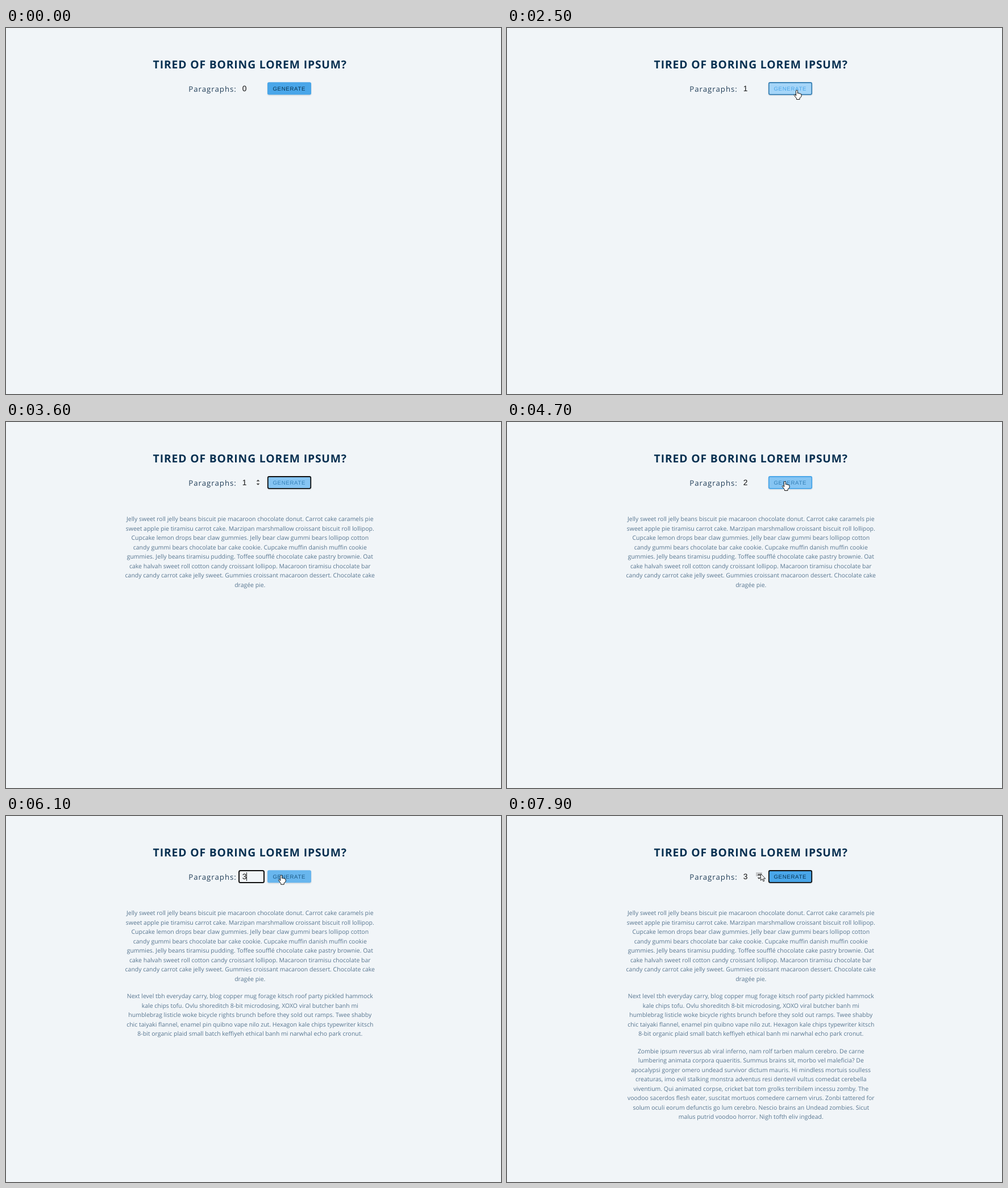
Write an HTML page that moves like this. It is 871 px wide and 643 px high and loops after 8 s.

```html
<!DOCTYPE html>
<html lang="en">
<head>
<meta charset="utf-8">
<title>Lorem ipsum generator</title>
<style>
  html, body { margin: 0; width: 100%; height: 100%; overflow: hidden; background: #f1f5f8; }
  svg { display: block; width: 871px; height: 643px; }
  text { font-family: "Open Sans", "Noto Sans", sans-serif; text-rendering: geometricPrecision; white-space: pre; }
  .title { font-size: 19.3px; font-weight: 700; letter-spacing: .87px; fill: #062f50; }
  .label { font-size: 13.2px; letter-spacing: 1.02px; fill: #24405a; }
  .value { font: 13.75px "Liberation Sans", Arial, sans-serif; fill: #111; }
  .caption { font: 9.6px "Liberation Sans", Arial, sans-serif; letter-spacing: .72px; }
  .para { font-size: 10.47px; fill: #587690; text-anchor: middle; }
  #face { filter: drop-shadow(0 1px 1px rgba(0, 0, 0, .16)); }
  #arrow, #hand { fill: #fff; stroke: #111; stroke-linejoin: round; }
</style>
</head>
<body>
<svg viewBox="0 0 871 643">
  <rect width="871" height="643" fill="#f1f5f8"/>
  <text class="title" x="258.6" y="71">TIRED OF BORING LOREM IPSUM?</text>
  <text class="label" x="321.3" y="111.8">Paragraphs:</text>

  <rect id="ring" x="410" y="96" width="44" height="21" rx="2.5" fill="none" stroke="#111" stroke-width="2"/>
  <text id="value" class="value" x="415.7" y="111.2"></text>
  <rect id="caret" x="423" y="99" width="1" height="15" fill="#222"/>
  <g id="spin" fill="#444">
    <rect id="hot" x="438" y="99" width="11" height="7" fill="#c6c8ca"/>
    <path d="M440.6 104.2l2.9-3 2.9 3zM440.6 107.9l2.9 3 2.9-3z"/>
  </g>

  <rect id="face" x="460" y="95.3" width="77" height="21.9" rx="2.75"/>
  <text id="caption" class="caption" x="469.4" y="109.8">GENERATE</text>
  <rect id="outline" x="460.8" y="96" width="75.4" height="20.8" rx="2.2" fill="none" stroke-width="1.8"/>

  <g id="copy"></g>

  <path id="arrow" stroke-width=".9" d="M.5 .5V12.2L3.2 9.7 5 13.9 6.8 13.1 5 9.1H8.7Z"/>
  <path id="hand" stroke-width="1" d="M-1.5 10V1.8a1.5 1.5 0 0 1 3 0V6a1.4 1.4 0 0 1 2.6.4 1.3 1.3 0 0 1 2.3.6 1.2 1.2 0 0 1 1.6 1.2v3.3L5 14v2.5H-.5V14.8L-4.6 9.3C-5.2 8-3.6 7.2-2.8 8.2Z"/>
</svg>
<script>
const LOOP = 8000, STEP = 100, FADE = 300, REPLY = 120;
const LEAD = 16.5, GAP = 14.2, TOP = 174, CENTER = 429.3;
const $ = id => document.getElementById(id);

// Each round: pick a number in the field, click the button, get one more paragraph
const rounds = [
  { pick: 1400, click: 2430, text: `Jelly sweet roll jelly beans biscuit pie macaroon chocolate donut. Carrot cake caramels pie
sweet apple pie tiramisu carrot cake. Marzipan marshmallow croissant biscuit roll lollipop.
Cupcake lemon drops bear claw gummies. Jelly bear claw gummi bears lollipop cotton
candy gummi bears chocolate bar cake cookie. Cupcake muffin danish muffin cookie
gummies. Jelly beans tiramisu pudding. Toffee soufflé chocolate cake pastry brownie. Oat
cake halvah sweet roll cotton candy croissant lollipop. Macaroon tiramisu chocolate bar
candy candy carrot cake jelly sweet. Gummies croissant macaroon dessert. Chocolate cake
dragée pie.` },
  { pick: 4400, click: 4700, text: `Next level tbh everyday carry, blog copper mug forage kitsch roof party pickled hammock
kale chips tofu. Ovlu shoreditch 8-bit microdosing, XOXO viral butcher banh mi
humblebrag listicle woke bicycle rights brunch before they sold out ramps. Twee shabby
chic taiyaki flannel, enamel pin quibno vape nilo zut. Hexagon kale chips typewriter kitsch
8-bit organic plaid small batch keffiyeh ethical banh mi narwhal echo park cronut.` },
  { pick: 5900, click: 6450, text: `Zombie ipsum reversus ab viral inferno, nam rolf tarben malum cerebro. De carne
lumbering animata corpora quaeritis. Summus brains sit, morbo vel maleficia? De
apocalypsi gorger omero undead survivor dictum mauris. Hi mindless mortuis soulless
creaturas, imo evil stalking monstra adventus resi dentevil vultus comedat cerebella
viventium. Qui animated corpse, cricket bat tom grolks terribilem incessu zomby. The
voodoo sacerdos flesh eater, suscitat mortuos comedere carnem virus. Zonbi tattered for
solum oculi eorum defunctis go lum cerebro. Nescio brains an Undead zombies. Sicut
malus putrid voodoo horror. Nigh tofth eliv ingdead.` }
];

// Pointer stops and the moves between them
const spinner = [446, 101], button = [489, 104], label = [350, 104], title = [555, 67];
const moves = [
  { from: 100, to: 400, stop: [345, 82] },
  { from: 400, to: 1000, stop: spinner },
  { from: 1600, to: 1800, stop: [498, 107] },
  { from: 1900, to: 2300, stop: [510, 109] },
  { from: 2600, to: 2700, stop: title },
  { from: 2700, to: 2900, stop: [590, 256] },
  { from: 2900, to: 3000, stop: [280, 150] },
  { from: 3000, to: 3300, stop: button },
  { from: 3400, to: 3700, stop: label },
  { from: 3700, to: 3800, stop: [448, 98] },
  { from: 4100, to: 4200, stop: spinner },
  { from: 4400, to: 4600, stop: button },
  { from: 5100, to: 5200, stop: title },
  { from: 5200, to: 5400, stop: [458, 105] },
  { from: 5400, to: 5600, stop: spinner },
  { from: 5900, to: 6200, stop: button },
  { from: 7000, to: 7600, stop: spinner }
];

const clamp = v => Math.min(1, Math.max(0, v));
const easeOut = p => 1 - (1 - p) ** 2;

function pointer(t) {
  if (t < moves[0].from) return { x: -50, y: -50 };
  let x = 286, y = 111;
  for (const m of moves) {
    const p = easeOut(clamp((t - m.from) / (m.to - m.from)));
    x += (m.stop[0] - x) * p;
    y += (m.stop[1] - y) * p;
  }
  return { x, y };
}

const inside = (p, l, t, r, b) => p.x >= l && p.x <= r && p.y >= t && p.y <= b;
const onButton = p => inside(p, 460, 95, 537, 117);
const onField = p => inside(p, 322, 95, 455, 118);
const mix = (a, b, p) => `rgb(${a.map((v, i) => Math.round(v + (b[i] - v) * p))})`;
const show = (el, on) => el.setAttribute('visibility', on ? 'visible' : 'hidden');

const DARK = [6, 50, 81], BLUE = [73, 166, 233], PALE = [165, 213, 248], BLACK = [16, 16, 16];

// The button colour fades towards its hover state
const glow = [0];
for (let i = 1; i < LOOP / STEP; i++) {
  const dir = onButton(pointer((i - 1) * STEP)) ? 1 : -1;
  glow[i] = clamp(glow[i - 1] + dir * STEP / FADE);
}

const add = (parent, tag) =>
  parent.appendChild(document.createElementNS(parent.namespaceURI, tag));

let y = TOP;
for (const round of rounds) {
  round.group = add($('copy'), 'g');
  for (const line of round.text.split('\n')) {
    const el = add(round.group, 'text');
    el.setAttribute('class', 'para');
    el.setAttribute('x', CENTER);
    el.setAttribute('y', y);
    el.textContent = line;
    y += LEAD;
  }
  y += GAP;
}

function render(t) {
  const p = pointer(t), before = pointer(t - STEP);
  const count = rounds.filter(r => r.pick <= t).length;
  const round = rounds[count - 1];
  const clicked = count > 0 && t >= round.click;
  const typing = count > 0 && !clicked;

  $('value').textContent = count;
  show($('ring'), typing);
  show($('caret'), typing && (t - round.pick) % 1000 < 600);
  show($('spin'), onField(p) || onField(before));
  show($('hot'), inside(p, 438, 99, 449, 106));

  const lit = glow[t / STEP];
  $('face').setAttribute('fill', mix(BLUE, PALE, lit));
  $('caption').setAttribute('fill', mix(DARK, BLUE, lit));
  show($('outline'), clicked);
  if (clicked) $('outline').setAttribute('stroke', mix(BLUE, BLACK, clamp((t - round.click) / FADE)));

  for (const r of rounds) show(r.group, t >= r.click + REPLY);

  const overText = inside(p, 322, 95, 437, 118) || inside(p, 209, 162, 650, 292);
  const hand = onButton(p);
  show($('hand'), hand);
  show($('arrow'), !hand && !overText);
  for (const id of ['hand', 'arrow'])
    $(id).setAttribute('transform', `translate(${p.x.toFixed(1)} ${p.y.toFixed(1)})`);
}

const start = performance.now();
function tick() {
  const t = (performance.now() - start) % LOOP;
  render(Math.floor(t / STEP) * STEP);
  requestAnimationFrame(tick);
}
tick();
</script>
</body>
</html>
```
